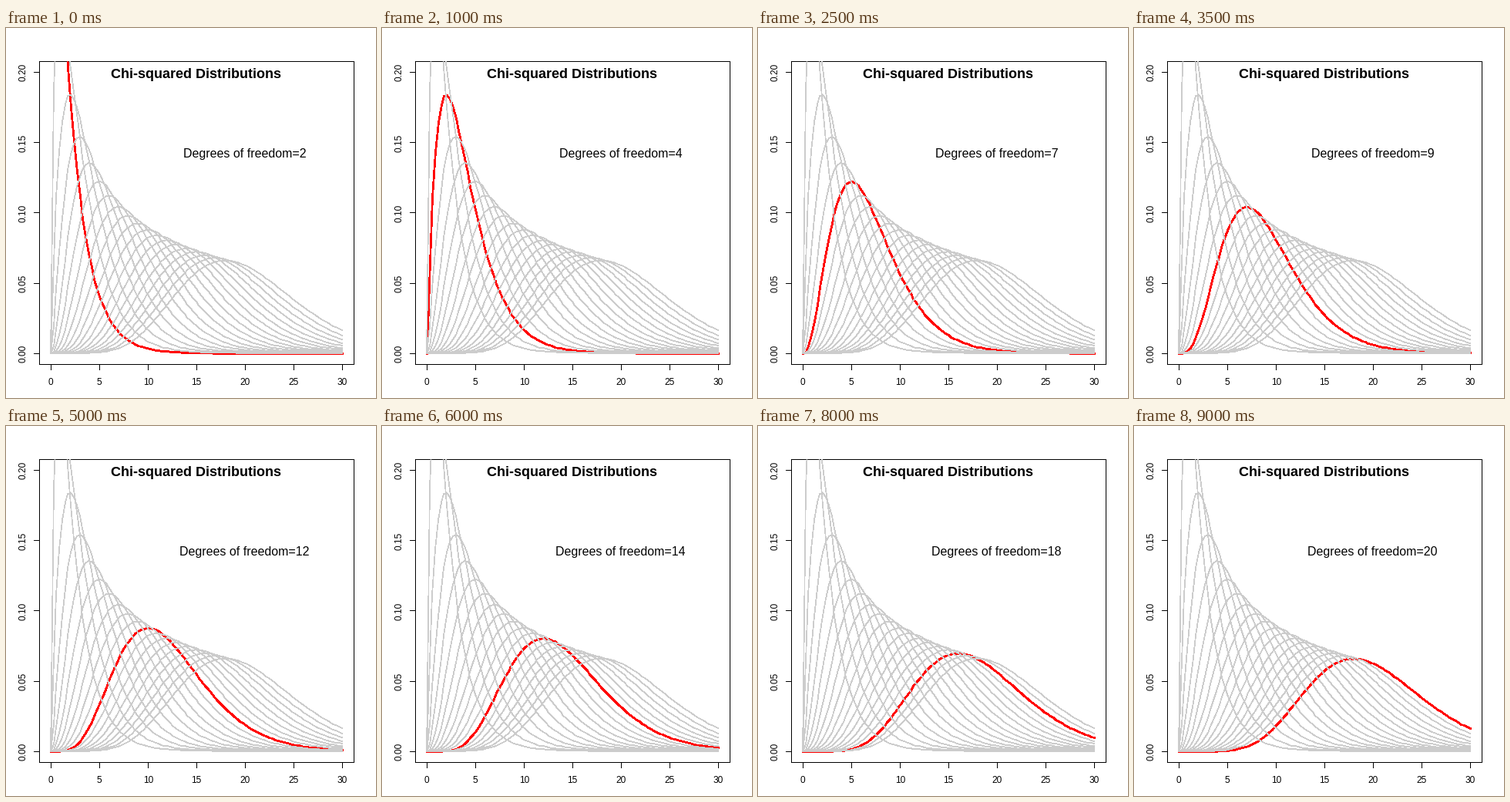
Write a matplotlib script that moves like this. It is 480 by 480 pixels and loops after 9.5 s.

```python
import math

import matplotlib.pyplot as plt
import numpy as np
from matplotlib.animation import FuncAnimation
from matplotlib.patches import Rectangle

SIZE, DPI = 480, 72
LEFT, TOP, RIGHT, BOTTOM = 43.2, 43.2, 451.2, 436.8
DFS = range(2, 21)
GREY = "#cccccc"

plt.rcParams["font.family"] = ["Liberation Sans", "DejaVu Sans"]
plt.rcParams["text.hinting"] = "native"


def px(x):
    """Data x (0..30) to pixels, with 4 % padding on both sides."""
    return LEFT + (RIGHT - LEFT) * (x / 30 + 0.04) / 1.08


def py(y):
    return BOTTOM - (BOTTOM - TOP) * (y / 0.2 + 0.04) / 1.08


def density(x, k):
    return x ** (k / 2 - 1) * np.exp(-x / 2) / (2 ** (k / 2) * math.gamma(k / 2))


xs = np.linspace(0, 30, 101)
col = np.floor(px(xs))
rows = {k: np.floor(py(density(xs, k))) for k in DFS}

fig = plt.figure(figsize=(SIZE / DPI, SIZE / DPI), dpi=DPI, facecolor="white")
ax = fig.add_axes([0, 0, 1, 1])
ax.set_xlim(0, SIZE)
ax.set_ylim(SIZE, 0)
ax.axis("off")


def line(x, y, color, width, z):
    # Without antialiasing every touched pixel is filled, so draw narrower.
    return ax.plot(x, y, color=color, lw=width - 1.3, zorder=z,
                   antialiased=False, snap=False, solid_capstyle="round",
                   solid_joinstyle="round")[0]


def rule(x, y):
    ax.plot(x, y, color="black", lw=1, zorder=1, antialiased=False,
            snap=False, solid_capstyle="projecting")


def label(x, y, s, size, **kw):
    return ax.text(x, y, s, fontsize=size, ha="center", va="baseline",
                   zorder=5, **kw)


# Box, ticks and labels
l, t, r, b = 43.5, 43.5, 451.5, 436.5
rule([l, r, r, l, l], [t, t, b, b, t])
for v in range(0, 31, 5):
    x = math.floor(px(v)) + 0.5
    rule([x, x], [b, b + 7])
    label(px(v), 463, str(v), 12)
for v in np.arange(5) * 0.05:
    y = math.ceil(py(v)) - 0.5
    rule([l, l - 7], [y, y])
    label(26, py(v), f"{v:.2f}", 12, rotation=90, rotation_mode="anchor")

label(246.7, 65, "Chi-squared Distributions", 18, weight="bold")
caption = label(309.7, 168, "", 16)

# Curves, clipped to the plot box
frame = Rectangle((43, 43), 409, 394, transform=ax.transData)
greys = {k: line(col, rows[k], GREY, 2, 3) for k in DFS}
red = line(col + 0.5, rows[2] + 0.5, "red", 3, 2)
for curve in [*greys.values(), red]:
    curve.set_clip_path(frame)


def update(i):
    k = DFS[i]
    for j, curve in greys.items():
        curve.set_visible(j != k)
    red.set_ydata(rows[k] + 0.5)
    caption.set_text(f"Degrees of freedom={k}")
    return [*greys.values(), red, caption]


anim = FuncAnimation(fig, update, frames=len(DFS), interval=500,
                     repeat=True, repeat_delay=0, blit=False)
plt.show()
```
